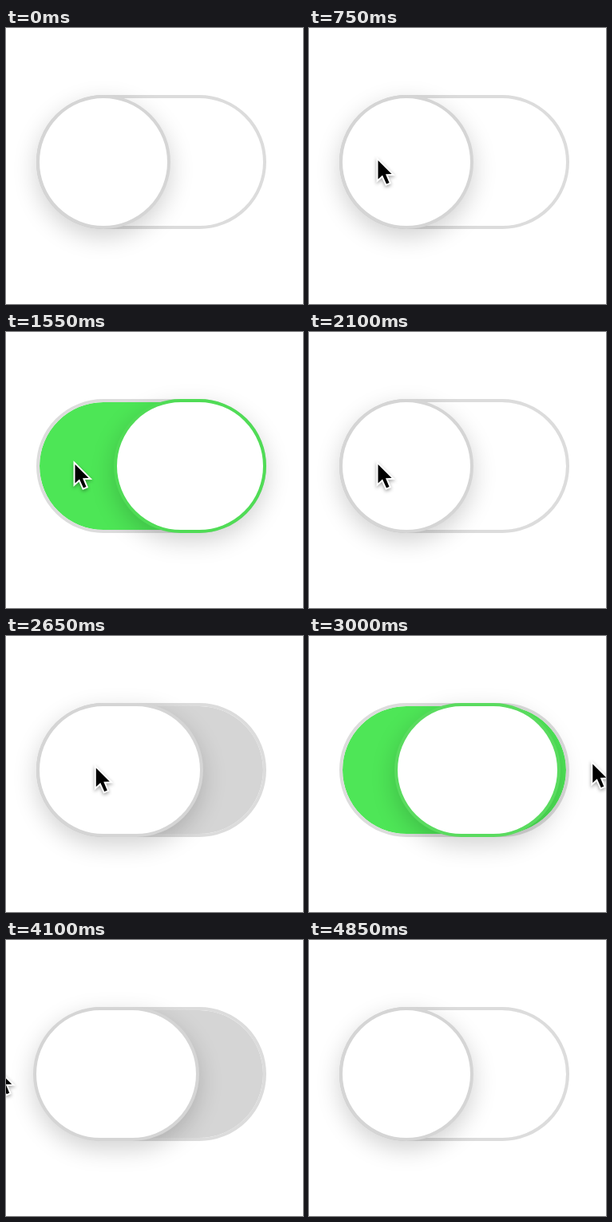
An HTML page that plays this animation: 372x346 px, repeating every 5550 ms.

```html
<!DOCTYPE html>
<html lang="en">
<head>
<meta charset="utf-8">
<title>Toggle switch</title>
<style>
  html, body { margin: 0; width: 100%; height: 100%; overflow: hidden; background: #fff; }
  #track, #knob {
    position: absolute; box-sizing: border-box; top: 84px; height: 168px;
    border: 4px solid; border-radius: 84px; background: #fff;
  }
  #track { left: 38px; width: 288px; border-color: #dcdcdc; }
  #knob { box-shadow: 0 10px 30px rgba(0, 0, 0, .18); }
  #cursor {
    position: absolute; left: 0; top: 0; overflow: visible;
    filter: drop-shadow(0 2px 2px rgba(0, 0, 0, .35));
  }
</style>
</head>
<body>
<div id="track"></div>
<div id="knob"></div>
<svg id="cursor" width="1" height="1">
  <path d="M0 0V23.5L5.5 18.5L10.5 29.5L14 28L9.5 17.2L17 17Z"
        fill="#000" stroke="#fff" stroke-width="4" paint-order="stroke"/>
</svg>
<script>
const LOOP = 5550, STEP = 50;
const LEFT = 38, RIGHT = 326, SIZE = 168, STRETCH = 40;
const GRAY = [213, 213, 213], GREEN = [77, 230, 86], RIM = [80, 220, 86];

const [track, knob, cursor] = ['track', 'knob', 'cursor'].map(id => document.getElementById(id));

// Times at which each state flips, starting from off: two clicks, then one long drag
const pressed = [920, 1080, 1468, 1720, 2370, 4170];
const on = [1080, 1720, 2866, 3880];
const filled = [920, 1720, 2370, 4170];

const linear = s => s;
const smooth = s => s * s * (3 - 2 * s);
const cubeIn = s => s ** 3;
const out = s => 1 - (1 - s) ** 1.8;

// Pointer: enter from below, drag right, drag left past the edge, leave below
const legs = [
  { from: 300, to: 750, x: 86.5, y: 166, easeX: out, easeY: out },
  { from: 2550, to: 3088, x: 376, y: 160, easeX: smooth, easeY: smooth },
  { from: 3240, to: 4270, x: -40, y: 164, easeX: smooth, easeY: smooth },
  { from: 4450, to: 4850, x: 70, y: 365, easeX: linear, easeY: cubeIn }
];

const mix = (a, b, k) => a + (b - a) * k;
const clamp = v => Math.min(1, Math.max(0, v));
const mixColor = (a, b, k) => `rgb(${a.map((v, i) => Math.round(mix(v, b[i], k)))})`;

function bezier(x1, y1, x2, y2) {
  const at = (a, b, s) => 3 * a * s * (1 - s) ** 2 + 3 * b * s * s * (1 - s) + s ** 3;
  return x => {
    let lo = 0, hi = 1;
    for (let i = 0; i < 24; i++) {
      const mid = (lo + hi) / 2;
      if (at(x1, x2, mid) < x) lo = mid; else hi = mid;
    }
    return at(y1, y2, lo);
  };
}
const spring = bezier(.54, 1.37, .5, 1);
const ease = bezier(.25, .1, .25, 1);

// Each flip eases from whatever value had been reached by then.
function transition(flips, t, easing, duration = 350) {
  const past = flips.filter(start => start <= t);
  if (!past.length) return 0;
  const value = past.length % 2, start = past.pop();
  const k = easing(clamp((t - start) / duration));
  return mix(transition(past, start, easing, duration), value, k);
}

function pointer(t) {
  let x = 215, y = 365;
  for (const leg of legs) {
    const s = clamp((t - leg.from) / (leg.to - leg.from));
    x = mix(x, leg.x, leg.easeX(s));
    y = mix(y, leg.y, leg.easeY(s));
  }
  return [x, y];
}

function draw(now) {
  const t = Math.floor(now % LOOP / STEP) * STEP;
  const width = SIZE + STRETCH * transition(pressed, t, spring);
  const left = mix(LEFT, RIGHT - width, transition(on, t, spring));
  const fill = 80 * transition(filled, t, ease);
  const fillColor = mixColor(GRAY, GREEN, transition(on, t, ease, 150));
  const [x, y] = pointer(t);

  track.style.boxShadow = `inset 0 0 0 ${fill}px ${fillColor}`;
  knob.style.left = left + 'px';
  knob.style.width = width + 'px';
  knob.style.borderColor = mixColor(GRAY, RIM, transition(on, t, ease, 200));
  cursor.style.transform = `translate(${x}px, ${y}px)`;
}

const begin = performance.now();
function loop() {
  draw(performance.now() - begin);
  requestAnimationFrame(loop);
}
loop();
</script>
</body>
</html>
```
